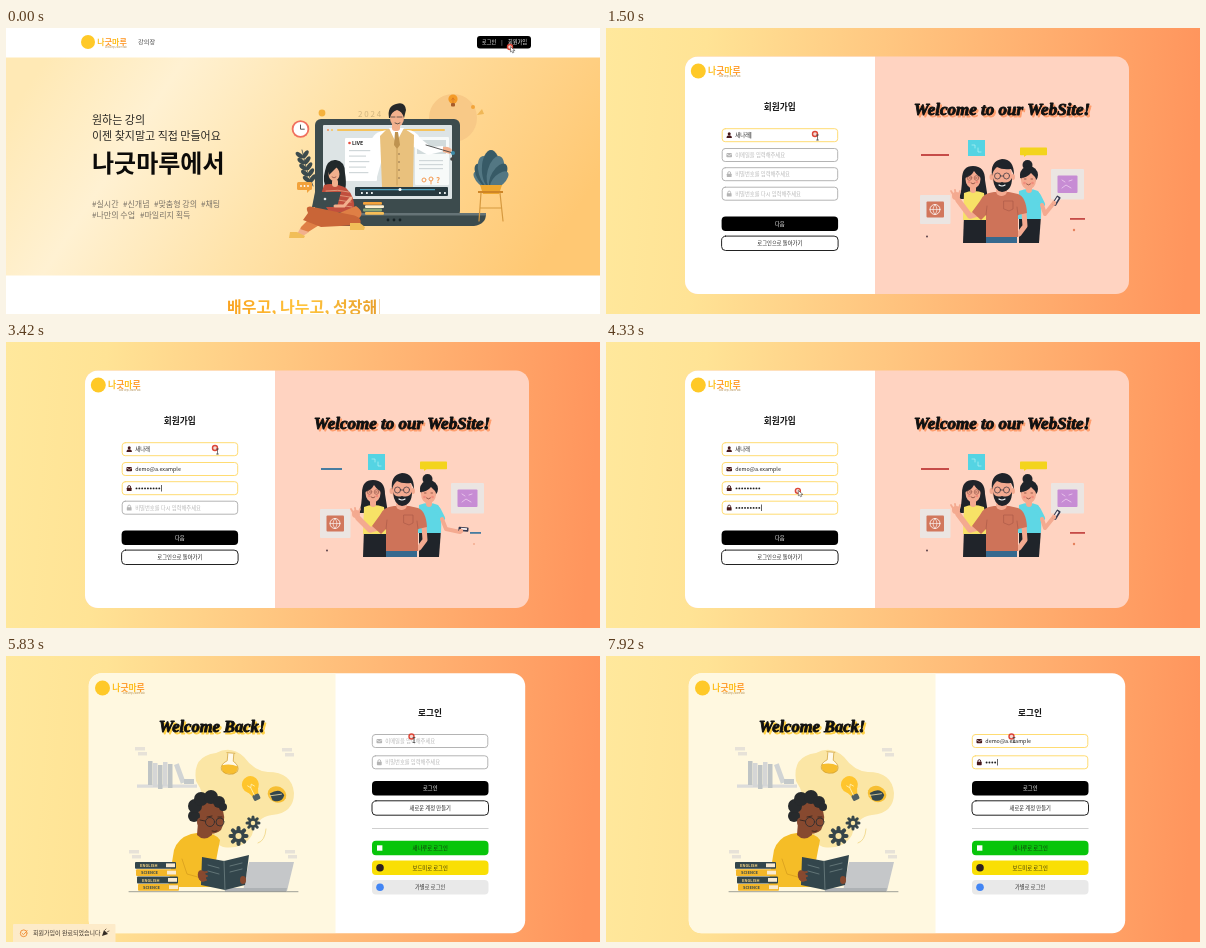
Write an HTML page with a canvas that moves like this. It is 594 px wide and 286 px high and loops after 8000 ms.

```html
<!DOCTYPE html>
<html lang="ko">
<head>
<meta charset="utf-8">
<title>회원가입</title>
<style>
html, body { margin: 0; width: 100%; height: 100%; overflow: hidden; background: #fff; }
canvas { display: block; width: 594px; height: 286px; }
</style>
</head>
<body>
<canvas id="stage"></canvas>
<script>
const W = 594, H = 286, LOOP = 8000, STEP = 1000 / 12;
const SANS = '"Noto Sans CJK KR", "Noto Sans CJK", "Noto Sans", sans-serif';
const BRAND = '나긋마루', USER = '새나래', MAIL = 'demo@a.example';
const canvas = document.getElementById('stage');
const ctx = canvas.getContext('2d');
const dpr = window.devicePixelRatio || 1;
canvas.width = W * dpr;
canvas.height = H * dpr;

// ---- drawing helpers ----
const clamp = (v, a = 0, b = 1) => Math.min(b, Math.max(a, v));
const count = (t, start, gap, max) => clamp(Math.floor((t - start) / gap), 0, max);

function fill(color, d) { ctx.fillStyle = color; ctx.fill(new Path2D(d)); }
function line(color, width, d) {
  ctx.strokeStyle = color; ctx.lineWidth = width;
  ctx.lineCap = ctx.lineJoin = 'round';
  ctx.stroke(new Path2D(d));
}
function disc(color, x, y, rx, ry = rx, rot = 0) {
  ctx.fillStyle = color; ctx.beginPath();
  ctx.ellipse(x, y, rx, ry, rot, 0, 7); ctx.fill();
}
function ring(color, x, y, r, width) {
  ctx.strokeStyle = color; ctx.lineWidth = width;
  ctx.beginPath(); ctx.arc(x, y, r, 0, 7); ctx.stroke();
}
function box(color, x, y, w, h, r = 0, edge, width = 1) {
  ctx.beginPath(); ctx.roundRect(x, y, w, h, r);
  if (color) { ctx.fillStyle = color; ctx.fill(); }
  if (edge) { ctx.strokeStyle = edge; ctx.lineWidth = width; ctx.stroke(); }
}
function text(s, x, y, size, color = '#222', weight = 400, align = 'left') {
  ctx.font = `${weight} ${size}px ${SANS}`;
  ctx.textAlign = align; ctx.textBaseline = 'alphabetic';
  ctx.fillStyle = color;
  ctx.fillText(s, x, y + size * 0.36);
  return ctx.measureText(s).width;
}
function gradient(x0, y0, x1, y1, ...stops) {
  const g = ctx.createLinearGradient(x0, y0, x1, y1);
  stops.forEach(([at, c]) => g.addColorStop(at, c));
  return g;
}
function script(s, x, y, size, shadow) {
  ctx.font = `italic 700 ${size}px "Liberation Serif", serif`;
  ctx.textAlign = 'center'; ctx.textBaseline = 'alphabetic';
  ctx.lineWidth = 0.9; ctx.lineJoin = 'round';
  for (const [c, d] of [[shadow, 1.8], ['#111', 0]]) {
    ctx.fillStyle = ctx.strokeStyle = c;
    ctx.fillText(s, x + d, y + d);
    ctx.strokeText(s, x + d, y + d);
  }
}
function at(x, y, rot, draw) {
  ctx.save(); ctx.translate(x, y); ctx.rotate(rot); draw(); ctx.restore();
}

// ---- shared parts ----
function logo(x, y, r, size) {
  disc('#ffc928', x, y, r);
  let pen = x + r + 2.3;
  [...BRAND].forEach((ch, i) => {
    pen += text(ch, pen, y - 0.3, size, i % 2 ? '#ff9a2b' : '#ffbf1f', 900);
  });
  text('slow steps, warm talk', pen, y + 5, 2.2, '#a98240', 500, 'right');
}

const icons = {
  person(x, y, c) { disc(c, x, y - 1.5, 1.5); fill(c, `M${x - 2.7} ${y + 2.8}q0 -2.8 2.7 -2.8t2.7 2.8z`); },
  mail(x, y, c, back) { box(c, x - 2.8, y - 2, 5.6, 4.2, 0.8); line(back, 0.6, `M${x - 2.5} ${y - 1}l2.5 1.6l2.5 -1.6`); },
  lock(x, y, c) { box(c, x - 2.4, y - 0.5, 4.8, 3.4, 0.6); line(c, 0.9, `M${x - 1.4} ${y}v-1.2a1.4 1.4 0 0 1 2.8 0v1.2`); },
  link(x, y, c) {
    at(x, y, -0.7, () => {
      box(null, -3.2, -1.2, 3.6, 2.4, 1.2, c, 0.8);
      box(null, -0.4, -1.2, 3.6, 2.4, 1.2, c, 0.8);
    });
  },
  square(x, y, c) { box(c, x - 2.4, y - 2.4, 4.8, 4.8); },
  circle(x, y, c) { disc(c, x, y, 2.7); },
  chat(x, y, c) { box(c, x - 2.6, y - 2.5, 5.2, 4, 0.8); fill(c, `M${x - 1.5} ${y + 1}v2.4l2.4 -2.4z`); }
};

function field(x, y, icon, hint, value, on, active, h = 13) {
  const filled = value && value.length > 0, top = y - 6.5;
  box('#fff', x, top, 115.5, h, 3, on ? '#ffdc73' : '#b4b4b4', 1);
  icons[icon](x + 7, y, filled || on ? '#45171a' : '#b5b5b5', '#fff');
  let pen = x + 13;
  if (filled && icon === 'lock') {
    for (let i = 0; i < value.length; i++) disc('#222', pen + 1.3 + i * 2.85, y + 0.2, 0.95);
    pen += value.length * 2.85;
  } else if (filled) pen += text(value, pen, y, 5.4, '#222', 500);
  else if (!on || !active) text(hint, pen, y, 5.3, '#b8b8b8');
  if (active) box('#222', pen + 0.4, y - 3.2, 0.7, 6.4);
}
function button(label, x, y, color, ink, edge) {
  box(color, x, y - 7.2, 116.5, 14.4, 4, edge, 1);
  text(label, x + 58.2, y, 5.3, ink, 500, 'center');
}
function backdrop() {
  box(gradient(0, 0, W, 40, [0, '#ffe89c'], [0.17, '#ffe395'], [1, '#ff955d']), 0, 0, W, H);
}
function card(x, y, w, h, split, left, right) {
  box(right, x, y, w, h, 13);
  ctx.save();
  ctx.beginPath(); ctx.rect(x, y, split - x, h); ctx.clip();
  box(left, x, y, w, h, 13);
  ctx.restore();
}

// ---- home ----
function leaf(c, x, y, len, rot) { at(x, y, rot, () => disc(c, 0, -len / 2, len * 0.24, len / 2)); }

function homeArt() {
  const dark = '#3c4b4d', skin = '#f2b08d';
  disc('#f8c987', 447, 90, 24);
  text('2 0 2 4', 352, 86, 8, '#cfb37d', 300);
  disc('#f5b23d', 316, 85, 3.4); disc('#f3a43a', 467, 79, 2);
  fill('#f0b757', 'M471 87l5 -6l2 5z');
  disc('#f49b27', 447, 71, 4.6); box('#a75b2a', 445, 75, 4, 3.5, 1);
  line('#d67321', 0.7, 'M445.5 72l1.5 -2l1.5 2M447 70v5');
  disc('#f0705e', 294.5, 101, 8.8); disc('#fff', 294.5, 101, 7);
  line('#444', 0.9, 'M294.5 97v4.2h3.8');
  // left sprigs
  line(dark, 0.8, 'M307 158q-8 -18 -11 -36');
  for (let i = 0; i < 5; i++) {
    leaf(dark, 297 + i * 1.8, 130 + i * 6, 9, -0.9);
    leaf(dark, 297 + i * 1.8, 130 + i * 6, 9, 0.6);
  }
  // laptop
  box(dark, 309, 91, 145, 98, 6); box('#dde4e5', 317, 97, 129, 74, 1);
  box('#f6c35b', 331, 101, 108, 2, 1); disc('#f08c55', 322, 102, 1); disc('#f6c35b', 326, 102, 1);
  fill(dark, 'M302 186H480q0 10 -12 12H326q-20 -1 -24 -12z');
  fill('#667477', 'M302 185h178v2.4H302z');
  for (const x of [382, 388, 394]) disc('#172326', x, 192, 1.4);
  box('#fff', 339, 110, 32, 43, 1);
  disc('#e64c3c', 343.5, 115, 1.3); text('LIVE', 346, 115, 5.2, '#222', 800);
  for (let i = 0; i < 5; i++) box('#d0d7d9', 343, 122 + i * 5.5, i % 2 ? 17 : 23, 1.2);
  box('#f7faf9', 409, 109, 34, 48, 1); box('#d2dbdc', 411, 112, 29, 14);
  for (let i = 0; i < 3; i++) box('#d0d7d9', 413, 132 + i * 4, 24, 1.2);
  ring('#f39a53', 418, 152, 2, 1); ring('#f39a53', 425, 151, 2, 1);
  line('#f39a53', 1, 'M425 153v3'); text('?', 432, 152, 8, '#f39a53', 700, 'center');
  // presenter
  fill('#fff', 'M382 102q-15 1 -17 12l-3 35q5 4 9 0l7 -25z');
  fill('#fff', 'M399 102q10 -1 15 8l11 9l12 -1l1 5l-16 4l-21 -12z');
  fill(skin, 'M437 119q6 -1 9 3l-2 4l-7 -2z'); line('#333', 0.8, 'M420 117l27 8');
  disc('#3d8ca9', 447, 125, 2); disc('#444', 446, 131, 1.8);
  fill('#e9c17d', 'M381 101L374 108L376 159H407L408 107L399 101z');
  fill('#fff', 'M383 100l7 15l8 -15z'); fill('#bf9350', 'M389 104h3l2 13l-3 4l-3 -4z');
  line('#b88a49', 0.6, 'M391 121v36'); for (let i = 0; i < 4; i++) disc('#72583a', 393, 126 + i * 8, 0.7);
  box(skin, 386, 95, 8, 8, 3); disc(skin, 391, 90, 7, 9);
  fill('#262829', 'M383 90q-2 -12 7 -14q9 -3 10 6l-2 8q-2 -7 -7 -8q-6 2 -7 8z');
  line('#333', 0.7, 'M385 89h4m2 0h5M389 95q3 2 5 0');
  box('#283a40', 349, 159, 93, 9, 1); box('#4fa0bc', 354, 161, 75, 1.3); disc('#fff', 394, 161.6, 1.5);
  for (const x of [355, 360, 365, 433, 438]) box('#e5ebeb', x, 164, 1.8, 2);
  // books and student
  ['#f4a33c', '#fff0d0', '#8ba675', '#f7be57'].forEach((c, i) => box(c, 357 + i % 2 * 2, 174 + i * 3.3, 19, 2.8, 1));
  fill('#22292b', 'M319 143q2 -12 11 -11q9 1 9 13q3 18 -4 22l-14 -5q-5 -9 -2 -19z');
  fill('#c14f3d', 'M318 157q10 -3 22 3q10 9 8 23l-24 2l-10 -15z');
  for (let i = 0; i < 4; i++) line('#f2c49c', 0.6, `M${320 + i} ${163 + i * 5}q12 -2 23 1`);
  box(skin, 326, 151, 6, 8, 3); disc(skin, 328, 146, 5.5, 7.2);
  fill('#22292b', 'M323 147q-2 -11 5 -13q8 0 8 9l-5 -4z');
  line('#87463d', 0.7, 'M326 149q2 2 4 0');
  fill('#df7f45', 'M350 178q10 7 2 13l-34 3l-19 12q-8 0 -4 -7l18 -18l18 5z');
  fill('#c96537', 'M302 185q-4 -8 5 -6l39 8q11 2 8 10l-39 2l-18 -7z');
  fill(skin, 'M294 201l9 3l-6 4l-6 -2z'); fill('#f1be58', 'M284 204l7 0l8 4l-1 2h-15z');
  fill('#f1be58', 'M344 195l10 0l5 4l-1 3h-14z');
  fill(dark, 'M309 164h26l-4 15h-25z'); disc('#dfe5e4', 319, 171, 1.3);
  line(skin, 3, 'M345 170l-7 8l-9 0');
  box('#f2a23c', 291, 154, 15, 8, 1.5); fill('#f2a23c', 'M301 160v5l4 -4z');
  for (let i = 0; i < 3; i++) disc('#fff', 295 + i * 3.5, 158, 0.9);
  // potted plant
  for (let i = 0; i < 7; i++) leaf(i % 2 ? '#375a66' : '#537783', 485, 160, 23 + (3 - Math.abs(i - 3)) * 5, (i - 3) * 0.27);
  fill('#eea72f', 'M474 157h22l-3 9h-16z'); box('#ce8527', 472, 163, 25, 2);
  line('#d6993f', 1.2, 'M475 165l-2 28M494 165l3 28M474 180h21');
}

function home() {
  box('#fff', 0, 0, W, H);
  box(gradient(60, 0, 500, 290, [0, '#ffe9b5'], [0.22, '#fff1d2'], [0.5, '#ffe3aa'], [1, '#ffc873']), 0, 29.5, W, 218);
  logo(82, 14, 7, 8);
  text('강의장', 132, 14, 6.2, '#444');
  box('#000', 471, 8, 54, 12.5, 3);
  text('로그인', 476, 14.3, 5.2, '#fff', 500);
  text('|', 496, 14, 5.2, '#fff', 500, 'center');
  text('회원가입', 502, 14.3, 5.2, '#fff', 500);
  text('원하는 강의', 86, 92, 11, '#292723');
  text('이젠 찾지말고 직접 만들어요', 86, 108, 11, '#292723');
  text(BRAND + '에서', 86, 135, 24, '#0c0b09', 900);
  [['#실시간', 86, 176], ['#신개념', 117, 176], ['#맞춤형 강의', 148, 176], ['#채팅', 195, 176],
   ['#나만의 수업', 86, 187], ['#마일리지 획득', 134, 187]].forEach(([s, x, y]) => text(s, x, y, 8, '#7c7468'));
  text('배우고, 나누고, 성장해', 221, 279, 16, gradient(221, 0, 370, 0, [0, '#f9a21f'], [0.5, '#ffc43d'], [1, '#e9a22e']), 700);
  box('#f6d7aa', 373, 271, 1, 15);
  homeArt();
}

// ---- sign-up ----
function tile(x, y, w, h, color) {
  box('#ebe5e2', x, y, w, h, 1);
  box(color, x + 6.5, y + 6.5, w - 13, h - 13, 1);
}
function face(x, y, skin) {
  disc(skin, x, y, 7.5, 9.5);
  line('#733a30', 0.7, `M${x - 4} ${y - 1}h1.5m5 0h1.5M${x - 2} ${y + 4}q2 2 4 0`);
  disc('#f28c7c', x - 4, y + 3, 1.3); disc('#f28c7c', x + 4, y + 3, 1.3);
}
function teamArt(t) {
  const gap = t % 4000 - 3420;
  const dip = Math.abs(gap) < 700 ? Math.cos(gap / 700 * Math.PI / 2) : 0;
  const accent = t < 900 || dip > 0 ? '#477ca0' : '#c64b48';
  const skin = '#f4aa90', ink = '#20242a', tee = '#ce7359';
  box(accent, 315, 126, 28 - 7 * dip, 2); box(accent, 464, 190, 15 - 4 * dip, 1.8);
  disc('#4b343f', 321, 208.5, 0.9); disc('#e5825d', 468, 202, 1.2 - 0.5 * dip);
  box('#55d4e3', 362, 112, 17, 16);
  line('#b7f3f3', 0.7, 'M366 117h3v3m3 0v4h3');
  box('#f3d41d', 414, 119.5, 27, 7.8, 0.7); fill('#f3d41d', 'M418 126v3l4 -3z');
  tile(314, 167, 30.5, 29, '#d2775c');
  ring('#fff', 329, 181.5, 5, 0.8);
  line('#fff', 0.6, 'M324 181.5h10M329 176.5q-4 5 0 10q4 -5 0 -10');
  tile(445, 141, 33, 30.5, '#c78cd4');
  line('#f4d8f4', 0.7, 'M456 152l3 2m4 -1l3 -1M456 160l4 -3l5 3');
  // left
  fill(ink, 'M356 151q0 -13 11 -13q12 0 12 14l3 19h-29q3 -9 3 -20z');
  fill(ink, 'M358 187h24v28h-25z');
  fill('#f7e266', 'M358 165q9 -4 20 0l4 27h-25z');
  box(skin, 364, 157, 6, 8, 3); face(367, 151, skin);
  fill(ink, 'M358 150q1 -12 10 -11q9 1 9 11q-5 -1 -9 -7q-3 6 -10 7z');
  ring('#753d36', 363.5, 150, 2.3, 0.5); ring('#753d36', 370.5, 150, 2.3, 0.5);
  // right
  fill(ink, 'M413 188h22l-2 27h-20z');
  fill('#5ed7e5', 'M413 163q10 -4 19 0q4 4 3 28h-23z');
  box(skin, 420, 157, 6, 8, 3);
  disc(ink, 421.5, 137, 5); disc(ink, 423, 147, 9); face(422.5, 152, skin);
  fill(ink, 'M414 150q0 -10 9 -9q9 0 8 10q-4 -4 -6 -6q-4 5 -11 5z');
  const px = 449 + 7 * dip, py = 174 + 14 * dip;
  line('#5ed7e5', 6, 'M432 168l4 8');
  line(skin, 4, `M436 177L${439 + dip} ${186 + dip}L${px - 2} ${py + 2}`);
  at(px + 1, py - 1, 0.55 + 1.1 * dip, () => { box('#34384e', -2, -5.5, 4.4, 10, 0.8); box('#f7eeee', -1, -4, 1.8, 6); });
  disc(skin, px - 1, py + 1, 2.2);
  // centre
  const hy = 168 + 4 * dip;
  line(skin, 5.5, `M374 185L364 188L352 ${hy + 4}`);
  disc(skin, 350, hy, 4);
  line(skin, 1.8, `M348 ${hy}l-3 -5M350 ${hy}l-1 -6M352 ${hy}l2 -5`);
  fill('#36698e', 'M380 205h31v10h-31z');
  line(skin, 5, 'M418 184l1 14l-6 8');
  fill(tee, 'M388 164q-11 1 -14 9l-8 11l9 8l5 -5v22h32v-22l9 -2q-1 -16 -9 -19l-9 -2z');
  line('#a75645', 0.6, 'M380 187l1 -9M412 187l-1 -8M398 173h9v8l-4 2l-5 -2z');
  box(skin, 390, 158, 11, 10, 5); disc(skin, 396, 148, 10, 13);
  disc(skin, 385.5, 149, 2, 3); disc(skin, 407, 149, 2, 3);
  fill(ink, 'M387 150q2 6 9 4q7 2 10 -4q0 13 -10 14q-8 -1 -9 -14z');
  fill(ink, 'M386 148q-2 -15 10 -17q12 0 12 16l-3 -6q-9 1 -14 -2q-4 3 -5 9z');
  ring('#30303c', 391.5, 148, 3, 0.7); ring('#30303c', 400.5, 148, 3, 0.7);
  line('#30303c', 0.7, 'M394.5 148h3'); line('#fff', 1.2, 'M393 157q3 2 6 0');
}

function profileForm(t) {
  const x = 116.2;
  const name = USER.slice(0, count(t, 920, 190, 3));
  const mail = MAIL.slice(0, count(t, 1750, 80, 14));
  const pass = '*'.repeat(count(t, 2960, 50, 9));
  const again = '*'.repeat(count(t, 3600, 50, 9));
  const bad = mail.length > 0 && mail.length < 12;
  const s = bad ? 2.4 : 0;
  const step = t < 900 ? -1 : t < 1660 ? 0 : t < 2950 ? 1 : t < 3560 ? 2 : 3;
  text('회원가입', 173.8, 79 - s, 8.7, '#111', 700, 'center');
  [['person', '이름(실명)을 입력해주세요', name, 107.2 - s],
   ['mail', '이메일을 입력해주세요', mail, 127 - s],
   ['lock', '비밀번호를 입력해주세요', pass, 146.2 + s],
   ['lock', '비밀번호를 다시 입력해주세요', again, 165.7 + s]
  ].forEach(([icon, hint, value, y], i) => field(x, y, icon, hint, value, step >= i, step === i && t < 4400));
  if (bad) text('올바른 이메일 형식으로 입력해주세요', 120, 133.6, 3.7, '#ee4b45');
  button('다음', 115.6, 195.8 + s, '#000', '#fff');
  button('로그인으로 돌아가기', 115.6, 215.3 + s, '#fff', '#222', '#222');
}
function extraForm() {
  const x = 116.2;
  text('* 선택 입력 사항으로, 다른 사용자들에게 공유되는 정보입니다.', 116, 71.5, 3.6, '#333', 500);
  [['link', '블로그 링크를'], ['square', '나래봄 링크를'], ['square', '빛누리 계정을'], ['circle', '이음마당 계정을']]
    .forEach(([icon, what], i) => field(x, 84 + i * 19.5, icon, what + ' 입력해주세요'));
  field(x, 162, 'chat', '자기소개를 입력해주세요', '', false, false, 48.5);
  text('0 / 500', 231.5, 208.3, 4, '#333', 500, 'right');
  button('회원가입 완료', 115.6, 233.8, '#000', '#fff');
}
function signup(t) {
  backdrop();
  card(79, 28.5, 444, 237.5, 269, '#fff', '#ffd3c1');
  logo(92.3, 43, 7.5, 8.8);
  script('Welcome to our WebSite!', 396, 87, 17, '#ff9d6c');
  teamArt(t);
  if (t < 4590) profileForm(t); else extraForm();
}

// ---- log-in ----
function gear(x, y, r) {
  ctx.strokeStyle = '#37464a'; ctx.lineWidth = r * 0.5;
  for (let i = 0; i < 8; i++) at(x, y, i * Math.PI / 4, () => { ctx.beginPath(); ctx.moveTo(0, 0); ctx.lineTo(r, 0); ctx.stroke(); });
  disc('#37464a', x, y, r * 0.78); disc('#fbe6a5', x, y, r * 0.38);
}
function studyArt(t) {
  const bob = Math.sin(t / 420), dark = '#33464c', skin = '#87492f';
  [[129, 91], [276, 92], [123, 194], [279, 194]].forEach(([x, y]) => {
    box('#e7e2d8', x, y, 10, 3.5); box('#e7e2d8', x + 3, y + 5, 9, 3.5);
  });
  fill('#fbe6a5', 'M190 125q-4 -25 20 -28q15 -8 28 4q10 14 24 15q24 0 26 21q0 20 -22 22q-16 2 -20 20q-9 15 -29 12q-25 -10 -20 -38q2 -15 -7 -28z');
  line('#f3dc94', 1, 'M252 187q7 -2 8 -14');
  // shelf
  box('#dcdcdb', 131, 128.5, 60, 3.2);
  for (let i = 0; i < 5; i++) box(i % 2 ? '#d5d6d6' : '#bfc4c5', 142 + i * 5, 105 + i * 7 % 5, 4.5, 24);
  at(168, 109, -0.35, () => box('#d1d4d4', 0, 0, 5, 20));
  box('#c4c9ca', 178, 123, 10, 5);
  // floating things
  at(224, 107 + bob, 0.08, () => {
    fill('#fff9e8', 'M-3 -11h6v8q7 4 5 10q-8 7 -16 0q-2 -6 5 -10z');
    fill('#f7be2f', 'M-8 2q8 -3 16 0q1 6 -4 8h-8q-5 -2 -4 -8z');
    line('#cf9e35', 0.7, 'M-4 -11h8M-3 -10v7q-7 4 -5 10q8 7 16 0q2 -6 -5 -10v-7');
  });
  at(246 + bob, 134, -0.45, () => {
    disc('#ffc52d', 0, -6, 8.5); fill('#ffc52d', 'M-6 -1l3 7h6l3 -7z');
    box('#526063', -3.5, 5, 7, 6, 1.5); line('#fff1b7', 0.8, 'M-3 -6l2 3l2 -3l2 3M-1 -3v8');
  });
  at(271, 138 + bob * 0.5, 0.4, () => {
    disc('#f6be32', 0, 0, 9.5, 8); fill(dark, 'M-7 2q7 -10 14 -4q1 9 -9 9z'); line('#fbe6a5', 0.7, 'M-6 4l10 -6');
  });
  gear(247, 167, 6); gear(232.5, 180, 8);
  // reader
  fill('#f5bd27', 'M185 178q-13 4 -17 16l-6 37h43l9 -47q-7 -10 -29 -6z');
  line('#d99f1e', 0.8, 'M176 203l5 15l18 5');
  fill(skin, 'M192 166h14v13q-8 7 -15 0z');
  fill(skin, 'M192 151q8 -9 22 -2q8 12 1 25q-10 8 -21 -1z');
  [[188, 160, 6], [189, 150, 7], [195, 143, 7], [205, 141, 7], [213, 146, 6], [217, 151, 4]]
    .forEach(([x, y, r]) => disc('#272a2c', x, y, r));
  disc(skin, 194, 166, 3, 4);
  ring('#292d30', 204, 166, 4.5, 0.8); ring('#292d30', 214, 166, 4, 0.8);
  line('#2a211f', 0.8, 'M199 165l-5 -1M201 161l5 -1M212 161l4 0M206 175q3 1 5 0');
  // laptop, book, stack
  fill('#c5c7c9', 'M243 206h45l-7 29h-44z'); fill('#aeb2b5', 'M219 232h62l-1 3.5h-61z');
  fill(dark, 'M196 201l22 4l25 -6l-4 30l-20 5l-24 -5z');
  line('#6e8082', 0.8, 'M218 205l1 29M202 209l11 3M202 215l11 3M224 210l12 -3M224 216l12 -3');
  disc(skin, 196, 220, 4, 6, -0.3); disc(skin, 237, 224, 3, 4);
  line(skin, 1.8, 'M194 217l7 -1M194 220l7 0M194 223l6 1');
  for (let i = 0; i < 4; i++) {
    const x = 129 + i * 5 % 4, y = 206 + i * 7.3;
    box(i % 2 ? '#f4b72a' : dark, x, y, 41, 6.8, 1);
    box('#f9ead0', x + 31, y + 1.4, 9, 3.8);
    text(i % 2 ? 'SCIENCE' : 'ENGLISH', x + 5, y + 3.5, 4, i % 2 ? dark : '#f5d382', 700);
  }
  line('#5e6667', 0.6, 'M123 235.7h169');
}
function login(t) {
  const x = 366.3, mid = 424;
  backdrop();
  card(82.7, 17.3, 436.5, 260, 329.5, '#fff8e0', '#fff');
  logo(96.5, 32, 7.5, 8.8);
  script('Welcome Back!', 206, 76, 16.5, '#ffd042');
  studyArt(t);
  const mail = MAIL.slice(0, count(t, 6520, 60, 14));
  const pass = '*'.repeat(count(t, 7640, 65, 4));
  text('로그인', mid, 57, 8.7, '#111', 700, 'center');
  field(x, 85, 'mail', '이메일을 입력해주세요', mail, t >= 6200, t >= 6200 && t < 7500);
  field(x, 106.3, 'lock', '비밀번호를 입력해주세요', pass, t >= 7500, t >= 7500);
  button('로그인', 366, 132.3, '#000', '#fff');
  button('새로운 계정 만들기', 366, 152, '#fff', '#222', '#222');
  box('#cfcfcf', 366, 172, 116.5, 0.9);
  button('새나루로 로그인', 366, 192, '#08c50b', '#12320e');
  box('#fff', 371, 189.3, 5.4, 5.4);
  button('보드미로 로그인', 366, 211.7, '#f9df05', '#37310d');
  disc('#2d2020', 374, 211.7, 3.8);
  button('가별로 로그인', 366, 231.3, '#e9e9e9', '#333');
  disc('#4285f4', 374, 231.3, 3.8);
}

// ---- overlays ----
function toast(t) {
  if (t < 5170 || t > 7300) return;
  const enter = 1 - (1 - clamp((t - 5170) / 330)) ** 2;
  const leave = clamp((t - 7000) / 300) ** 2;
  ctx.save();
  ctx.translate(-110 * (1 - enter + leave), 0);
  box('#fdebc9', 7, 268, 102.5, 20, 1);
  ring('#ef8b32', 17.7, 277.3, 3.4, 0.9);
  line('#ef8b32', 0.9, 'M16 277.2l1.5 1.5l3.6 -4');
  text('회원가입이 완료되었습니다', 27, 276.7, 6, '#3c332b', 500);
  fill('#332b24', 'M96 280l2 -6l4 4z');
  line('#5f4935', 0.8, 'M99 274l1 -1M101 276l2 -1');
  ctx.restore();
}

const path = [[0, 504, 19], [250, 504, 19], [500, 210, 114.5], [600, 210, 114.5], [900, 209, 106],
  [4200, 209, 106], [4480, 173, 196], [4670, 173, 196], [4850, 173, 233], [5080, 173, 233],
  [5330, 371, 135], [5580, 405.5, 80.5], [LOOP, 405.5, 80.5]];

function pointer(t) {
  const i = path.findIndex(p => p[0] > t);
  const [t0, x0, y0] = path[i - 1], [t1, x1, y1] = path[i];
  const k = (t - t0) / (t1 - t0);
  const x = x0 + (x1 - x0) * k, y = y0 + (y1 - y0) * k;
  disc('#f6d9d2', x, y, 2.6);
  ring('#dc4638', x, y, 2.5, 1.4);
  const typing = (t > 450 && t < 4200) || t > 5550;
  if (typing) line('#444', 0.7, `M${x + 1.5} ${y + 1}h2m-1 0v5m-1 0h2`);
  else {
    const d = `M${x + 0.5} ${y}v5l1.2 -1l1 2l1.2 -.6l-1 -1.8h1.8z`;
    fill('#fff', d); line('#333', 0.5, d);
  }
}

function frame(now) {
  const ms = now % LOOP;
  const t = Math.min(Math.floor((ms + 5) / STEP) * STEP, LOOP - 1);
  ctx.setTransform(dpr, 0, 0, dpr, 0, 0);
  if (t < 249) home();
  else if (t < 5410) signup(t);
  else login(t);
  toast(t);
  pointer(t);
  requestAnimationFrame(frame);
}
const begin = performance.now();
requestAnimationFrame(function start() {
  frame(Math.max(0, performance.now() - begin));
});
</script>
</body>
</html>
```
